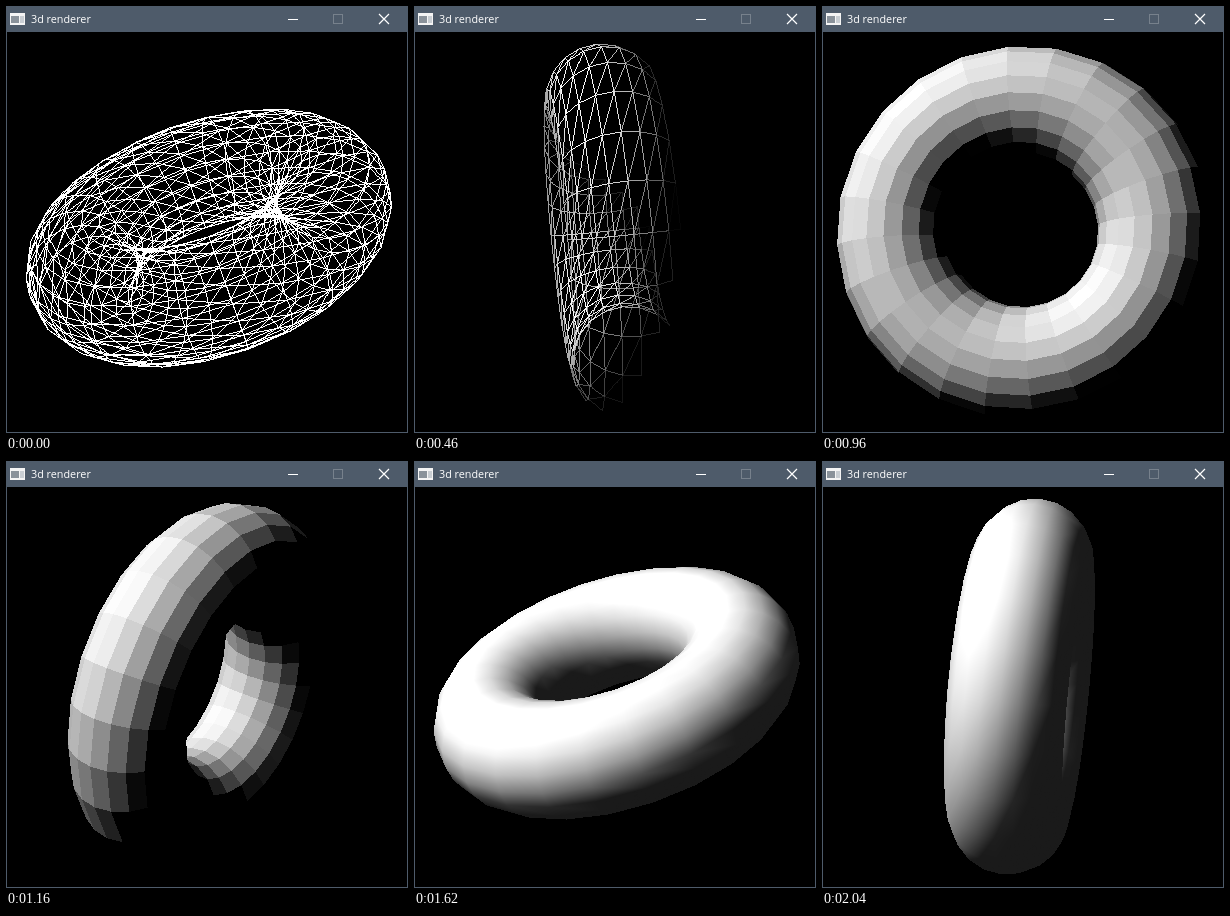
An HTML page with a canvas that plays this animation: 402x427 px, repeating every 2140 ms.

```html
<!DOCTYPE html>
<html lang="en">
<head>
<meta charset="utf-8">
<title>3d renderer</title>
<style>
  html, body { margin: 0; width: 402px; height: 427px; overflow: hidden; background: #4e5b6a; }
  canvas { position: absolute; left: 0; top: 0; display: block; }
  #title {
    position: absolute; left: 25px; top: 5px;
    font: 10.8px/16px "Open Sans", "Noto Sans", sans-serif;
    color: #fff; white-space: pre;
  }
</style>
</head>
<body>
<canvas id="stage" width="402" height="427"></canvas>
<div id="title">3d renderer</div>
<script>
const ctx = document.getElementById('stage').getContext('2d');
const SIZE = 400, MID = 200, SCALE = 188.3, CAM = 10.5;
const RING = 0.7, TUBE = 0.3, SEGS = 24, SIDES = 20;
const STEP = 20, LAST = 102, LOOP = 2140;
const LIT_AT = 21, FLAT_AT = 41, SMOOTH_AT = 62;
const RAD = Math.PI / 180;
const AMBIENT = 0.1;
const LIGHT = [-1, 1, 1].map(v => v / Math.sqrt(3));

const image = ctx.createImageData(SIZE, SIZE);
const pixels = new Uint32Array(image.data.buffer);
const depth = new Float32Array(SIZE * SIZE);

// Torus mesh: points with normals, and triangles sharing one diagonal per quad
const mesh = [], tris = [];
for (let i = 0; i < SEGS; i++) {
  const u = (i * 360 / SEGS - 4.5) * RAD, cu = Math.cos(u), su = Math.sin(u);
  for (let j = 0; j < SIDES; j++) {
    const v = j * 360 / SIDES * RAD, cv = Math.cos(v), sv = Math.sin(v);
    const rad = RING + TUBE * cv;
    mesh.push({ p: [rad * cu, rad * su, TUBE * sv], n: [cv * cu, cv * su, sv] });
    const at = (a, b) => (a % SEGS) * SIDES + b % SIDES;
    const A = at(i, j), B = at(i + 1, j), C = at(i + 1, j + 1), D = at(i, j + 1);
    tris.push([A, B, D], [B, C, D]);
  }
}

const dot = (a, b) => a[0] * b[0] + a[1] * b[1] + a[2] * b[2];
const sub = (a, b) => [a[0] - b[0], a[1] - b[1], a[2] - b[2]];
const cross = (a, b) => [
  a[1] * b[2] - a[2] * b[1],
  a[2] * b[0] - a[0] * b[2],
  a[0] * b[1] - a[1] * b[0]
];

function grey(v) {
  const c = Math.round(255 * Math.min(1, Math.max(0, v)));
  return (0xff000000 | c << 16 | c << 8 | c) >>> 0;
}

// Nearly steady turning that runs slightly ahead early on
const angle = step => 281 + 8.91 * step + 3.5 * Math.sin(2 * Math.PI * step / LAST);

// Rotation around the (1,1,1) diagonal
function turn(deg) {
  const part = shift => (1 + 2 * Math.cos((deg - shift) * RAD)) / 3;
  const a = part(0), b = part(120), c = part(240);
  return p => [
    a * p[0] + c * p[1] + b * p[2],
    b * p[0] + a * p[1] + c * p[2],
    c * p[0] + b * p[1] + a * p[2]
  ];
}

function line(a, b, color) {
  const dx = b.x - a.x, dy = b.y - a.y;
  const n = Math.max(1, Math.ceil(Math.max(Math.abs(dx), Math.abs(dy))));
  for (let k = 0; k <= n; k++) {
    const x = Math.floor(a.x + dx * k / n), y = Math.floor(a.y + dy * k / n);
    if (x < 0 || y < 0 || x >= SIZE || y >= SIZE) continue;
    const at = y * SIZE + x;
    if (color > pixels[at]) pixels[at] = color;
  }
}

function fill(a, b, c, area, la, lb, lc) {
  const x0 = Math.max(0, Math.floor(Math.min(a.x, b.x, c.x)));
  const x1 = Math.min(SIZE - 1, Math.ceil(Math.max(a.x, b.x, c.x)));
  const y0 = Math.max(0, Math.floor(Math.min(a.y, b.y, c.y)));
  const y1 = Math.min(SIZE - 1, Math.ceil(Math.max(a.y, b.y, c.y)));
  for (let y = y0; y <= y1; y++) {
    for (let x = x0; x <= x1; x++) {
      const px = x + 0.5, py = y + 0.5;
      const wa = ((b.x - px) * (c.y - py) - (b.y - py) * (c.x - px)) / area;
      const wb = ((c.x - px) * (a.y - py) - (c.y - py) * (a.x - px)) / area;
      const wc = 1 - wa - wb;
      if (wa < 0 || wb < 0 || wc < 0) continue;
      const z = wa * a.z + wb * b.z + wc * c.z, at = y * SIZE + x;
      if (z <= depth[at]) continue;
      depth[at] = z;
      pixels[at] = grey(wa * la + wb * lb + wc * lc);
    }
  }
}

function drawTorus(step) {
  const spin = turn(angle(step));
  const pts = mesh.map(({ p, n }) => {
    const pos = spin(p), k = SCALE / (1 - pos[2] / CAM);
    return {
      pos, x: MID + pos[0] * k, y: MID - pos[1] * k, z: 1 / (CAM - pos[2]),
      light: AMBIENT + Math.max(0, dot(spin(n), LIGHT))
    };
  });
  pixels.fill(grey(0));
  depth.fill(0);

  for (const [i, j, k] of tris) {
    const a = pts[i], b = pts[j], c = pts[k];
    const area = (b.x - a.x) * (c.y - a.y) - (b.y - a.y) * (c.x - a.x);
    if (step >= LIT_AT && area >= 0) continue;
    const n = cross(sub(b.pos, a.pos), sub(c.pos, a.pos));
    const lit = dot(n, LIGHT) / Math.hypot(...n);
    if (step < FLAT_AT) {
      const color = step < LIT_AT ? grey(1) : grey(lit);
      line(a, b, color);
      line(b, c, color);
      line(c, a, color);
    } else if (step < SMOOTH_AT) {
      fill(a, b, c, area, lit, lit, lit);
    } else {
      fill(a, b, c, area, a.light, b.light, c.light);
    }
  }
  ctx.putImageData(image, 1, 26);
}

function rect(color, x, y, w, h) {
  ctx.fillStyle = color;
  ctx.fillRect(x, y, w, h);
}

function drawWindow() {
  rect('#4e5b6a', 0, 0, 402, 427);
  // small window icon
  rect('#f4f4f4', 4, 7, 15, 12);
  rect('#8a929a', 5, 10, 8, 7);
  rect('#c9ced3', 14, 10, 4, 7);
  // minimise, maximise, close
  rect('#fff', 282, 13, 10, 1);
  ctx.lineWidth = 1;
  ctx.strokeStyle = '#77818c';
  ctx.strokeRect(327.5, 8.5, 9, 9);
  ctx.strokeStyle = '#fff';
  ctx.lineWidth = 1.2;
  ctx.beginPath();
  ctx.moveTo(373, 8);
  ctx.lineTo(383, 18);
  ctx.moveTo(383, 8);
  ctx.lineTo(373, 18);
  ctx.stroke();
}

let shown = -1;
const start = performance.now();

function frame() {
  const t = Math.max(0, performance.now() - start) % LOOP;
  const step = Math.min(LAST, Math.floor(t / STEP));
  if (step !== shown) {
    drawTorus(step);
    shown = step;
  }
  requestAnimationFrame(frame);
}

drawWindow();
frame();
</script>
</body>
</html>
```
